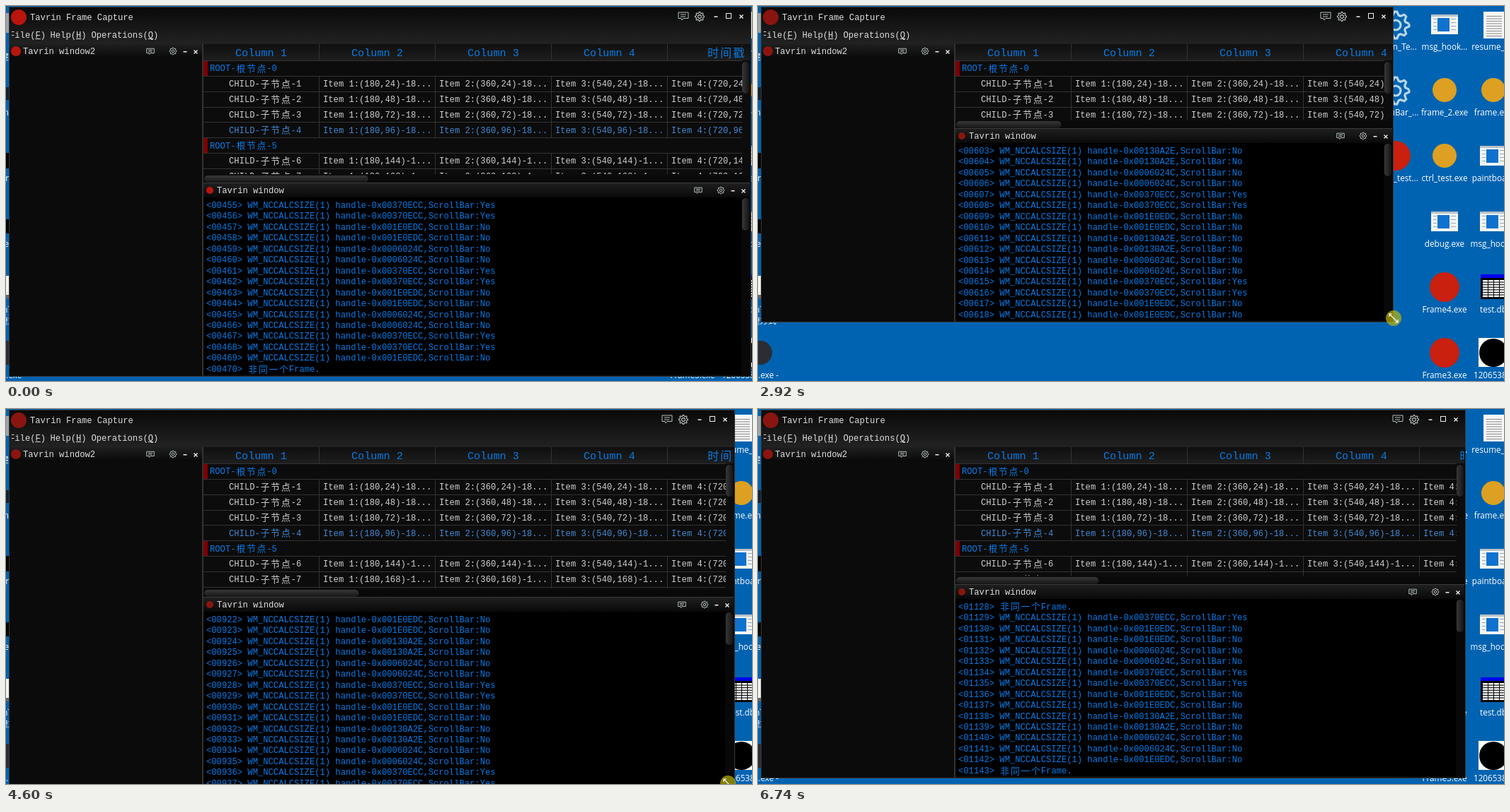
Animation of 1054x531 px, one loop 6.9 s. Source, as an HTML page with a canvas:

```html
<!DOCTYPE html>
<html lang="en">
<head>
<meta charset="utf-8">
<title>Frame capture</title>
<style>
  html, body { margin: 0; width: 100%; height: 100%; overflow: hidden; background: #0063b1; }
  canvas { display: block; width: 1054px; height: 531px; }
</style>
</head>
<body>
<canvas id="stage" width="1054" height="531"></canvas>
<script>
const ctx = document.getElementById('stage').getContext('2d');
const LOOP = 6900, CHAR = 7.3, ROW = 21.87, COL = 164;
const MONO = '"Liberation Mono", monospace';
const CJK = '"Noto Sans CJK SC", "Noto Sans CJK", sans-serif';
const UI = '11.7px "Open Sans", ' + CJK;
const BLUE = '#087be6', TEXT = '#dedede', RULE = '#333';

// time, hold, window right, window bottom, first log line, pointer x, pointer y
const TRACK = [
  [0, 680, 1053, 525, 455, 1075, 550],
  [930, 880, 1053, 525, 455, 1043, 515],
  [2170, 40, 936, 446, 487, 930, 436],
  [2500, 30, 880, 433, 537, 872, 424],
  [2920, 100, 898, 448, 603, 898, 442],
  [3210, 20, 922, 461, 659, 915, 452],
  [3400, 30, 918, 445, 696, 844, 371],
  [3600, 0, 868, 373, 732, 858, 362],
  [3910, 20, 868, 373, 789, 862, 367],
  [4140, 20, 873, 378, 831, 931, 436],
  [4600, 30, 1030, 541, 922, 1020, 530],
  [4850, 0, 1055, 565, 971, 1040, 520],
  [5100, 40, 1055, 565, 1021, 994, 511],
  [5290, 70, 960, 481, 1046, 950, 470],
  [5700, 0, 935, 463, 1085, 925, 452],
  [6050, 850, 1000, 523, 1128, 992, 513]
];

// first line, cycle origin, cycle length
const CYCLES = [
  [455, 455, 6], [471, 492, 8], [520, 607, 8], [640, 700, 8], [770, 834, 8],
  [843, 843, 8], [900, 1024, 8], [1025, 1025, 8], [1100, 1128, 6],
  [1134, 1126, 8], [1142, 1140, 8]
];
const HANDLES = ['00370ECC', '001E0EDC', '00130A2E', '0006024C'];
const NOTICES = [470, 843, 1025, 1128, 1143];

const ICONS = [
  [901, ['gear', 'gear', 'red'], ['Tavrin_Te...', 'MenuBar_...', 'scroll_test...']],
  [970, ['app', 'gold', 'gold', 'app', 'red', 'red'],
    ['msg_hook...', 'frame_2.exe', 'ctrl_test.exe', 'debug.exe', 'Frame4.exe', 'Frame3.exe']],
  [1039, ['doc', 'gold', 'app', 'app', 'table', 'black'],
    ['resume_s...', 'frame.exe', 'paintboard', 'msg_hook...', 'test.db', '1206538...']]
];

function pose(t) {
  let i = TRACK.length - 1;
  while (TRACK[i][0] > t) i--;
  const a = TRACK[i], b = TRACK[i + 1], start = a[0] + a[1];
  if (!b || t <= start) return a.slice(2);
  const k = (t - start) / (b[0] - start);
  return a.slice(2).map((v, j) => v + (b[j + 2] - v) * k);
}

function rect(x, y, w, h, color) {
  ctx.fillStyle = color;
  ctx.fillRect(x, y, w, h);
}

function fade(x, y, w, h, from, to) {
  const g = ctx.createLinearGradient(0, y, 0, y + h);
  g.addColorStop(0, from);
  g.addColorStop(1, to);
  rect(x, y, w, h, g);
}

function disc(x, y, r, color) {
  ctx.fillStyle = color;
  ctx.beginPath();
  ctx.arc(x, y, r, 0, 7);
  ctx.fill();
}

function lines(color, width, ...paths) {
  ctx.strokeStyle = color;
  ctx.lineWidth = width;
  ctx.beginPath();
  for (const [x, y, ...rest] of paths) {
    ctx.moveTo(x, y);
    for (let i = 0; i < rest.length; i += 2) ctx.lineTo(rest[i], rest[i + 1]);
  }
  ctx.stroke();
}

function clipped(x, y, w, h, draw) {
  ctx.save();
  ctx.beginPath();
  ctx.rect(x, y, Math.max(0, w), Math.max(0, h));
  ctx.clip();
  draw();
  ctx.restore();
}

// Latin letters take one cell, Chinese ones two
function text(s, x, y, color = TEXT, cell = CHAR) {
  ctx.fillStyle = color;
  ctx.textAlign = 'left';
  for (const run of s.match(/[\x00-\x7f]+|[^\x00-\x7f]+/g)) {
    const wide = run > '\x7f';
    ctx.font = wide ? `${cell * 1.75}px ${CJK}` : `${cell / 0.6}px ${MONO}`;
    ctx.letterSpacing = wide ? `${cell / 4}px` : '0px';
    ctx.fillText(run, x + (wide ? cell / 8 : 0), y + (wide ? 0 : 1));
    x += run.length * cell * (wide ? 2 : 1);
  }
  ctx.letterSpacing = '0px';
}

function label(s, x, y, align = 'center') {
  ctx.font = UI;
  ctx.fillStyle = '#fff';
  ctx.textAlign = align;
  ctx.fillText(s, x, y);
}

function gear(x, y, r, color) {
  const p = [];
  for (let i = 0; i <= 32; i++) {
    const a = (i - 0.5) * Math.PI / 16, d = i % 4 < 2 ? r : r * 0.76;
    p.push(x + d * Math.cos(a), y + d * Math.sin(a));
  }
  lines(color, Math.max(1, r / 6), p);
  ctx.beginPath();
  ctx.arc(x, y, r * 0.37, 0, 7);
  ctx.stroke();
}

function bubble(x, y, s) {
  const w = 7 * s, h = 5 * s;
  lines('#b5c0c0', 1,
    [x - w, y - h, x + w, y - h, x + w, y + h * 0.7, x, y + h * 0.7, x - 2 * s, y + h * 1.2,
      x - 3 * s, y + h * 0.7, x - w, y + h * 0.7, x - w, y - h],
    [x - 4 * s, y - 2 * s, x + 4 * s, y - 2 * s], [x - 4 * s, y + s, x + 3 * s, y + s]);
}

function minimise(x, y) { rect(x - 2.5, y - 0.5, 5, 1.5, '#eee'); }
function cross(x, y) {
  lines('#eee', 1.4, [x - 2.5, y - 2.5, x + 2.5, y + 2.5], [x + 2.5, y - 2.5, x - 2.5, y + 2.5]);
}

function thumb(x, y, w, h) {
  const g = w > h ? ctx.createLinearGradient(0, y, 0, y + h) : ctx.createLinearGradient(x, 0, x + w, 0);
  g.addColorStop(0, '#373737');
  g.addColorStop(1, '#151515');
  ctx.fillStyle = g;
  ctx.beginPath();
  ctx.roundRect(x, y, w, h, 5);
  ctx.fill();
}

function icon(kind, x, y) {
  if (kind === 'gear') gear(x, y + 1, 19, '#b9d6e6');
  if (kind === 'red') disc(x, y, 21, '#c9200f');
  if (kind === 'gold') disc(x, y, 17, '#dda022');
  if (kind === 'app') {
    rect(x - 19, y - 14, 38, 28, '#f4f4f4');
    rect(x - 19, y - 14, 38, 3, '#b8c2c8');
    rect(x - 10, y - 9, 17, 19, '#0f72cf');
    for (let i = 0; i < 4; i++) {
      rect(x - 16, y - 8 + i * 5, 5, 1, '#9aa');
      rect(x + 9, y - 8 + i * 5, 7, 1, '#9aa');
    }
  }
  if (kind === 'doc') {
    rect(x - 14, y - 18, 30, 38, '#f6f6f6');
    for (let i = 0; i < 9; i++) rect(x - 10, y - 12 + i * 3.5, 22, 1, '#8a8a8a');
  }
  if (kind === 'table') {
    rect(x - 18, y - 18, 38, 35, '#000');
    rect(x - 18, y - 18, 38, 5, '#0000f0');
    for (let i = 0; i < 7; i++)
      for (let j = 0; j < 4; j++) rect(x - 15 + j * 8, y - 10 + i * 3.6, 7, 2.5, '#fff');
  }
  if (kind === 'black') {
    rect(x - 21, y - 21, 42, 41, '#fff');
    disc(x, y, 20, '#000');
  }
}

function desktop() {
  rect(0, 0, 1054, 531, '#0063b1');
  for (const [x, kinds, names] of ICONS)
    kinds.forEach((kind, i) => {
      icon(kind, x, 26 + 93 * i);
      label(names[i], x, 59 + 93 * i);
    });
  for (const [y, h, c] of [[10, 28, '#9aa4ac'], [115, 18, '#123'], [208, 22, '#000'], [302, 20, '#000']])
    rect(0, y, 4, h, c);
  [['建', 73], ['n', 152], ['er', 245], ['re', 338]].forEach(([s, y]) => label(s, 4, y, 'right'));
  rect(0, 382, 21, 27, '#f1f1f1');
  rect(0, 409, 10, 5, '#666');
  label('nToG...', 33, 431, 'right');
  label('捷方式', 26, 447, 'right');
  disc(3, 491, 17, '#2b2d33');
  label('.exe -', 29, 524, 'right');
}

function logLine(n) {
  const id = `<${String(n).padStart(5, '0')}> `;
  if (NOTICES.includes(n)) return id + '非同一个Frame.';
  const [, origin, size] = CYCLES.filter(c => c[0] <= n).pop();
  let h = ((n - origin) % size + size) % size >> 1;
  if (size === 6 && h === 2) h = 3;
  const yes = h === 0 || h === 3 && n >= 770 && n < 900;
  return `${id}WM_NCCALCSIZE(1) handle-0x${HANDLES[h]},ScrollBar:${yes ? 'Yes' : 'No'}`;
}

function paneHeader(name, x, y, right, tint) {
  fade(x, y, right - x, 20, '#1f1f1f', '#090909');
  disc(x + 9, y + 10, x > 100 ? 5 : 7, tint);
  text(name, x + 19, y + 10);
  bubble(right - 73, y + 10, 0.75);
  gear(right - 41, y + 10, 5, '#b5c0c0');
  minimise(right - 24, y + 10.5);
  cross(right - 9, y + 11);
}

function table(R, S) {
  rect(279, 54, R - 281, S - 54, '#0c0c0c');
  fade(279, 54, R - 281, 23, '#0f0f0f', '#1e1e1e');
  clipped(279, 54, R - 281, S - 55, () => {
    for (let c = 0; c < 5; c++) {
      const x = 279 + COL * c;
      text(c < 4 ? `Column ${c + 1}` : '时间戳', c < 4 ? x + 45 : 990, 66, BLUE, 9.1);
      rect(x + COL - 1, 54, 1, 23, RULE);
    }
  });
  clipped(279, 77, R - 292, S - 90, () => {
    for (let r = 0; r < 11; r++) {
      const top = Math.round(77 + ROW * r), mid = 88 + ROW * r;
      rect(279, top, R, 1, RULE);
      if (r % 5 === 0) {
        rect(279, top + 1, 6, 21, '#7d0000');
        text(`ROOT-根节点-${r}`, 288, mid, BLUE);
        continue;
      }
      const color = r === 4 ? '#4388d2' : '#d0d0d0';
      text(`CHILD-子节点-${r}`, 315, mid, color);
      for (let c = 1; c < 5; c++) {
        const x = 279 + COL * c;
        rect(x - 1, top, 1, 22, RULE);
        const cell = `Item ${c}:(${180 * c},${24 * r})-18`;
        text(cell.slice(0, 18) + '...', x + 5, mid, color);
      }
    }
  });
  clipped(279, 77, R - 281, S - 77, () => {
    rect(279, S - 11, R - 281, 10, '#090909');
    thumb(R - 13, 79, 10, 45);
    thumb(280, S - 11, (R - 278) ** 2 / 2590, 10);
  });
}

function guide(x, y) {
  rect(x - 45, y - 45, 41, 90, 'rgba(30,30,30,.82)');
  rect(x + 5, y + 5, 40, 40, 'rgba(30,30,30,.82)');
  rect(x + 5, y - 45, 40, 41, 'rgba(0,112,225,.88)');
}

function appWindow(t, R, B, first) {
  const S = B - 274;
  const bare = t >= 2165 && t < 2210;
  const bright = t < 2400 || t > 3200 && t < 3700 || t > 5400 && t < 6740;
  const tint = bright ? '#b9150d' : '#8a1510';

  rect(4, 1, R - 4, B - 1, '#0b0b0b');
  fade(4, 1, R - 4, 53, '#090909', '#222');
  disc(18, 16, 11, tint);
  text('Tavrin Frame Capture', 34, 16);
  clipped(8, 30, R, 24, () => {
    [['File(F)', 5], ['Help(H)', 62.5], ['Operations(Q)', 120.5]].forEach(([s, x]) => {
      text(s, x, 41);
      rect(x + (s.length - 2) * CHAR, 46, CHAR, 1, TEXT);
    });
  });
  bubble(R - 96, 14, 1);
  gear(R - 73, 15, 6.5, '#c0c8c8');
  minimise(R - 50, 15);
  ctx.strokeStyle = '#eee';
  ctx.lineWidth = 1;
  ctx.strokeRect(R - 35.5, 10.5, 7, 7);
  cross(R - 14, 15);

  if (!bare) {
    paneHeader('Tavrin window2', 5, 54, 277, tint);
    rect(277, 54, 2, B - 55, RULE);
    table(R, S);
    rect(279, S - 1, R - 281, 1, '#3a3a3a');
    paneHeader('Tavrin window', 279, S, R - 2, tint);
  }
  const top = S + (bare ? 22 : 20), left = bare ? 282 : 279;
  const width = R - left - (bare ? 13 : 2);
  rect(left, top, width, B - 3 - top, '#000');
  clipped(left, top, width, B - 3 - top, () => {
    for (let i = 0; i < 17; i++) text(logLine(first + i), 283, S + 30.5 + 15.48 * i, BLUE);
  });
  if (!bare) {
    rect(R - 14, top, 12, B - 3 - top, '#080808');
    thumb(R - 13, S + 21, 10, 46);
  }
  ctx.strokeStyle = '#383838';
  ctx.lineWidth = 1;
  ctx.strokeRect(4.5, 1.5, R - 5, B - 2);

  if (t >= 3395 && t < 3430 || t >= 5095 && t < 5140) guide((4 + R) / 2, B / 2);
}

function pointer(x, y, pressed) {
  disc(x, y, 11, `rgba(200,190,0,${pressed ? 0.65 : 0.5})`);
  lines('#fff', 1.2, [x - 6, y - 6, x + 6, y + 6],
    [x - 2, y - 6, x - 6, y - 6, x - 6, y - 2], [x + 2, y + 6, x + 6, y + 6, x + 6, y + 2]);
}

function draw(now) {
  const t = now % LOOP;
  const [r, b, n, x, y] = pose(t);
  const R = Math.round(r), B = Math.round(b);
  ctx.textBaseline = 'middle';
  desktop();
  // the frame shrinks before its contents are laid out again
  const late = t >= 5095 && t < 5140;
  clipped(4, 1, (late ? x + 11 : R) - 4, (late ? y + 10 : B) - 1,
    () => appWindow(t, R, B, Math.floor(n)));
  if (t >= 680 && t < 6050) pointer(x, y, t >= 1420);
  requestAnimationFrame(loop);
}

const begin = performance.now();
function loop() { draw(performance.now() - begin); }
loop();
</script>
</body>
</html>
```
